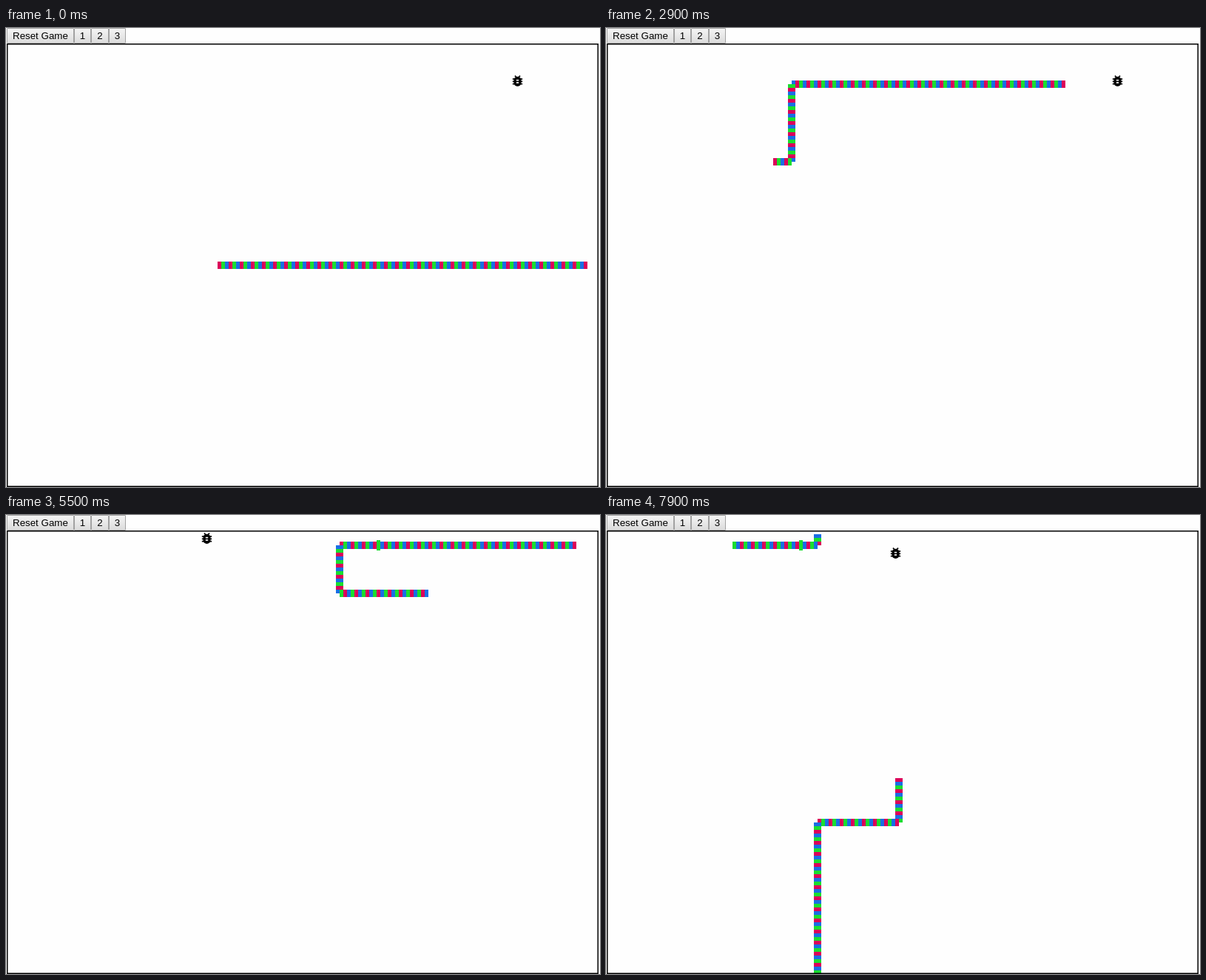
Animation of 803x621 px, one loop 8 s. Source, as an HTML page with a canvas:

```html
<!DOCTYPE html>
<html lang="en">
<head>
<meta charset="utf-8">
<title>Snake</title>
<style>
  html, body { margin: 0; width: 803px; height: 621px; overflow: hidden; background: #fefefe; }
  canvas { position: absolute; left: 0; top: 0; }
  .bar { position: absolute; left: 1px; top: 0; display: flex; }
  .bar span {
    box-sizing: border-box; height: 21px; padding: 0 7px;
    border: 1px solid #a2a2a2; border-radius: 1px;
    background: linear-gradient(#f4f4f4, #dcdcdc);
    font: 13.333px/19px "Liberation Sans", Arial, sans-serif;
    color: #000; white-space: nowrap;
  }
</style>
</head>
<body>
<canvas id="stage" width="803" height="621"></canvas>
<div class="bar"><span>Reset Game</span><span>1</span><span>2</span><span>3</span></div>
<script>
const ctx = document.getElementById('stage').getContext('2d');
const LOOP = 8000, FRAME = 100, STEP = 5, START_LEN = 100;
const BOARD = { x: 1, y: 21, w: 800, h: 600 };
const COLORS = ['#dc005a', '#1a6ee4', '#1ade30']; // from the head backwards

const DIRS = { R: [1, 0], L: [-1, 0], U: [0, -1], D: [0, 1] };
const ROUTE = 'R127 U28 R26 U21 R92 D6 L52 U13 R127 U45 R22 U12';

// Steps taken by the head at given times (ms)
const PACE = [
  [0, 0], [900, 54], [1800, 110], [1900, 115], [2700, 161], [2900, 176], [3600, 215],
  [3900, 235], [5400, 324], [5500, 329], [6600, 392], [7900, 471]
];

// Each bug stays until the head's step count reaches `eaten`
const BUGS = [
  { x: 691.5, y: 71.5, eaten: 189 },
  { x: 511.5, y: 51.5, eaten: 276 },
  { x: 271.5, y: 31.5, eaten: 388 },
  { x: 391.5, y: 51.5, eaten: Infinity }
];

function buildPath() {
  const path = [];
  let x = 286, y = 321;
  for (const run of ROUTE.split(' ')) {
    const [dx, dy] = DIRS[run[0]];
    for (let n = +run.slice(1); n > 0; n--) {
      const seg = { x, y, dx, dy, hidden: false };
      x += dx * STEP;
      y += dy * STEP;
      // the step that wraps round an edge is not drawn
      if (x >= BOARD.x + BOARD.w) { x = BOARD.x; seg.hidden = true; }
      if (y <= BOARD.y) { y = BOARD.y + BOARD.h; seg.hidden = true; }
      path.push(seg);
    }
  }
  return path;
}
const path = buildPath();

function stepsAt(t) {
  let i = 1;
  while (i < PACE.length - 1 && t > PACE[i][0]) i++;
  const [t0, s0] = PACE[i - 1], [t1, s1] = PACE[i];
  return Math.round(s0 + (s1 - s0) * (t - t0) / (t1 - t0));
}

// The snake grows once a swallowed bug has reached its tail
function lengthAt(steps) {
  let len = START_LEN;
  for (const bug of BUGS) if (steps >= bug.eaten + len) len++;
  return len;
}

function drawSegment(seg, color, half) {
  if (seg.hidden) return;
  const ex = seg.x + seg.dx * STEP, ey = seg.y + seg.dy * STEP;
  const px = seg.dx ? 0 : half, py = seg.dy ? 0 : half;
  ctx.fillStyle = color;
  ctx.fillRect(Math.min(seg.x, ex) - px, Math.min(seg.y, ey) - py,
    Math.abs(ex - seg.x) + 2 * px, Math.abs(ey - seg.y) + 2 * py);
}

function drawSnake(steps) {
  const head = START_LEN - 1 + steps, len = lengthAt(steps);
  const bulges = BUGS.filter(b => b.eaten <= steps).map(b => START_LEN - 1 + b.eaten);
  for (let i = 0; i < len; i++) {
    const at = head - i;
    if (at >= 0) drawSegment(path[at], COLORS[i % 3], bulges.includes(at) ? 7 : 5);
  }
}

function drawBug({ x, y }) {
  ctx.save();
  ctx.translate(x, y);
  ctx.scale(20 / 24, 20 / 24);
  ctx.translate(-12, -12);
  ctx.fillStyle = ctx.strokeStyle = '#000';
  ctx.lineWidth = 2;
  ctx.beginPath();
  ctx.arc(12, 11, 6, Math.PI, 0);
  ctx.arc(12, 15, 6, 0, Math.PI);
  ctx.fill();
  for (const leg of [8, 12, 16]) ctx.fillRect(4, leg, 16, 2);
  ctx.beginPath();
  ctx.moveTo(7.7, 3.7);
  ctx.lineTo(10.5, 6.5);
  ctx.moveTo(16.3, 3.7);
  ctx.lineTo(13.5, 6.5);
  ctx.stroke();
  ctx.fillStyle = '#fefefe';
  for (const slot of [10, 14]) ctx.fillRect(10, slot, 4, 2);
  ctx.restore();
}

function draw(t) {
  const steps = stepsAt(t);
  ctx.fillStyle = '#fefefe';
  ctx.fillRect(0, 0, 803, 621);
  ctx.save();
  ctx.beginPath();
  ctx.rect(BOARD.x, BOARD.y, BOARD.w, BOARD.h);
  ctx.clip();
  drawSnake(steps);
  drawBug(BUGS.find(b => steps < b.eaten));
  ctx.strokeStyle = '#000';
  ctx.lineWidth = 3;
  ctx.strokeRect(BOARD.x, BOARD.y, BOARD.w, BOARD.h);
  ctx.restore();
}

let begin = null;
function tick(now) {
  if (begin === null) begin = now;
  const t = (now - begin) % LOOP;
  draw(Math.floor(t / FRAME) * FRAME);
  requestAnimationFrame(tick);
}
draw(0);
requestAnimationFrame(tick);
</script>
</body>
</html>
```
